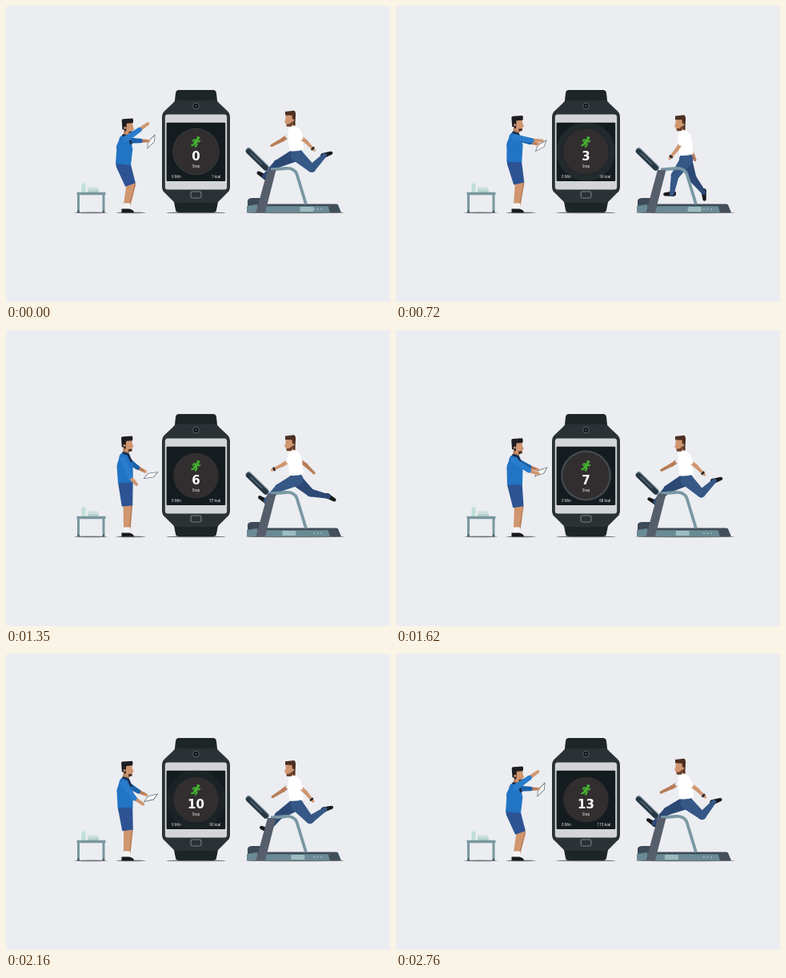
Write an HTML page with a canvas that moves like this. It is 480x370 px and loops after 2.79 s.

```html
<!DOCTYPE html>
<html lang="en">
<head>
<meta charset="utf-8">
<title>Treadmill session</title>
<style>
html, body { margin: 0; width: 100%; height: 100%; overflow: hidden; background: #ebedf1; }
canvas { display: block; width: 480px; height: 370px; }
</style>
</head>
<body>
<canvas id="stage"></canvas>
<script>
const LOOP = 2790, TICK = 30, STRIDE = LOOP / 5, CHEER = LOOP / 3, PULSE = LOOP / 2;
const SKIN = '#cf9670', SKIN_SHADE = '#b87d58', SHOE = '#17191c';
const canvas = document.getElementById('stage');
const g = canvas.getContext('2d');
const dpr = window.devicePixelRatio || 1;
canvas.width = 480 * dpr;
canvas.height = 370 * dpr;
g.scale(dpr, dpr);

const clamp = x => Math.max(0, Math.min(1, x));
const smooth = (a, b, x) => { const k = clamp((x - a) / (b - a)); return k * k * (3 - 2 * k); };
const mix = (a, b, k) => a + (b - a) * k;
const mixPt = (a, b, k) => [mix(a[0], b[0], k), mix(a[1], b[1], k)];
const wave = (u, peak) => Math.cos(2 * Math.PI * (u - peak));

// Angles run from straight down, positive towards the left
function polar(p, deg, len) {
  const a = deg * Math.PI / 180;
  return [p[0] - len * Math.sin(a), p[1] + len * Math.cos(a)];
}
function unit(a, b) {
  const len = Math.hypot(b[0] - a[0], b[1] - a[1]) || 1;
  return [(b[0] - a[0]) / len, (b[1] - a[1]) / len];
}

function line(pts, color, width, cap = 'round') {
  g.beginPath();
  pts.forEach(p => g.lineTo(p[0], p[1]));
  g.lineCap = cap;
  g.lineJoin = 'round';
  g.lineWidth = width;
  g.strokeStyle = color;
  g.stroke();
}
function disc(x, y, r, fill) {
  g.beginPath();
  g.arc(x, y, r, 0, 7);
  g.fillStyle = fill;
  g.fill();
}
function box(x, y, w, h, r, fill) {
  g.beginPath();
  g.roundRect(x, y, w, h, r);
  g.fillStyle = fill;
  g.fill();
}
function path(d, fill) {
  g.fillStyle = fill;
  g.fill(new Path2D(d));
}
function text(s, x, y, font, align = 'center') {
  g.font = font;
  g.textAlign = align;
  g.fillStyle = '#fff';
  g.fillText(s, x, y);
}
function shadow(x1, x2) {
  g.beginPath();
  g.ellipse((x1 + x2) / 2, 258.3, (x2 - x1) / 2, .9, 0, 0, 7);
  g.fillStyle = '#6d7377';
  g.fill();
}
// Tapered segment with square ends
function tube(a, b, w1, w2, fill) {
  const [dx, dy] = unit(a, b);
  g.beginPath();
  for (const [p, w] of [[a, w1], [a, -w1], [b, -w2], [b, w2]]) g.lineTo(p[0] - dy * w / 2, p[1] + dx * w / 2);
  g.fillStyle = fill;
  g.fill();
}
function limb(a, b, w1, w2, fill) {
  tube(a, b, w1, w2, fill);
  disc(a[0], a[1], w1 / 2, fill);
  disc(b[0], b[1], w2 / 2, fill);
}

function table() {
  const steel = '#7a979f';
  shadow(85, 127);
  box(94.5, 221.5, 5, 12, 1.5, '#bfe0d8');
  box(95.5, 219.6, 3, 2.2, .5, '#dcebea');
  box(102, 226.4, 13, 3, 1, '#c9dfdc');
  box(102, 229.8, 14, 3.2, 1, '#b4d0ce');
  for (const x of [89, 120.5]) {
    box(x, 234, 3, 22.5, 0, steel);
    disc(x + 1.5, 257, 1.5, '#4a565c');
  }
  box(88.5, 232.8, 36, 3.4, .8, steel);
}

function watch(t) {
  const strap = '#1e2527';
  shadow(200, 275);
  path('M216 105H259Q262.500 105 263 109L264.500 123H210.500L212 109Q212.500 105 216 105Z', strap);
  path('M209 240H266L263 255Q262.700 258 259 258H216Q212.300 258 212 255Z', strap);
  path('M213 118H262Q265 119 267 122L276 130.500Q280 133.500 280 139V226Q280 231 276 234L267 243' +
       'Q265 246 262 246H213Q210 246 208 243L199 234Q195 231 195 226V139Q195 133.500 199 130.500L208 122' +
       'Q210 119 213 118Z', '#2a3235');
  disc(237.5, 125, 4, '#667074');
  disc(237.5, 125, 3.3, '#11171a');
  disc(237.5, 125, 1.4, '#304657');
  box(198.8, 135.6, 77.4, 93.8, 3.5, '#d3d5d6');
  box(200.6, 145.8, 73.6, 73.2, 1, '#151c20');
  box(230.5, 231.5, 14, 9, 2.4, '#788185');
  box(231.6, 232.6, 11.8, 6.8, 1.5, '#2a3235');

  const label = '4.5px "Open Sans", "Noto Sans", sans-serif';
  text('0 Min', 207, 214.6, label, 'left');
  text(Math.floor(1 + t * .0415) + ' kcal', 268.5, 214.6, label, 'right');

  const q = (t % PULSE) / 850;
  if (q < 1) {
    g.globalAlpha = 1 - smooth(.6, 1, q);
    disc(237.5, 182, 29 + 9 * q, '#42484b');
    disc(237.5, 182, 28 + 2.6 * q, '#1d2326');
    g.globalAlpha = 1;
  }
  disc(237.5, 182, 28.3, '#322e30');

  const green = '#45b030';
  disc(240.3, 165, 2, green);
  line([[238.8, 168], [236.3, 171]], green, 4);
  line([[236.3, 171.2], [238.6, 173], [237, 175.6]], green, 2.3);
  line([[236, 171.4], [234.6, 173.6], [232.4, 174.2]], green, 2.3);
  line([[233.6, 168.8], [235, 167], [239, 168], [240.8, 169.8], [242.4, 168.6]], green, 1.8);
  text(Math.floor(t * 13 / 2760 + 1e-6), 237.5, 193.4, 'bold 15px "DejaVu Sans", sans-serif');
  text('Step', 237.5, 202, label);
}

function coach(t) {
  const p = (t % CHEER) / CHEER;
  const c = smooth(0, 1, .5 + .75 * wave(p, .015));
  const lift = p < .5 ? smooth(0, .03, p) : 0;
  const at = (stand, crouch) => mixPt(stand, crouch, c);
  const shirt = '#2274c4', shorts = '#2d5393', dark = '#1d1d22';

  const shoulder = at([148.5, 160], [148.5, 168]);
  const hip = at([149.5, 191], [146.5, 198]);
  const knee = at([151.5, 220], [155.5, 223.5]);
  const head = at([144, 133], [144.7, 141]);

  shadow(137, 175);
  limb([knee[0] + 1.5, knee[1]], [152.5, 248], 10, 6.5, SKIN_SHADE);
  limb(knee, [150.5, 248], 10, 7, SKIN);
  box(146.8, 246.6, 8.6, 7, 1, '#f3f4f4');
  path('M144.500 253.500H154Q159.500 254.500 160 258.200H144.500Z', SHOE);
  limb(hip, hip, 18, 18, shorts);
  tube(hip, knee, 18.5, 13.5, shorts);

  // Arm with the tablet
  const pad = at([181, 181.7], [181.5, 169.6 - lift]);
  const elbow = polar([shoulder[0] + 3.5, shoulder[1] + 2], mix(-51, -95, c), 16);
  const hand = polar(elbow, mix(-63, -90, c), 10.5);
  limb(elbow, hand, 4.8, 3.4, SKIN_SHADE);
  limb(shoulder, elbow, 8, 5.5, '#1c62aa');

  // Torso and head
  const neck = [head[0] + 6, head[1] + 16];
  limb(neck, [neck[0], neck[1] + 4], 7, 8, SKIN_SHADE);
  limb(shoulder, [mix(shoulder[0], hip[0], .3), mix(shoulder[1], hip[1], .3)], 14.5, 20, shirt);
  tube(polar(shoulder, 0, 9), hip, 20, 19, shirt);
  line([[shoulder[0] - 2, shoulder[1] - 6.5], [shoulder[0] + 4, shoulder[1] - 4.5], [shoulder[0] + 8, shoulder[1] + 4]], '#1b2b48', 2.6);
  g.save();
  g.translate(...head);
  path('M3 4H13.500L13.800 9L15.600 13L13.800 14.200L13.200 18Q9 20.500 4.500 17.500Z', SKIN);
  path('M0 2Q0 .6 2 .3L13.500 -.4Q15 1 14 5.200L6.200 5.800L5.800 10.500L5.600 15.500H4L3 13.500H.8Z', dark);
  path('M8.500 16.300L13.500 15.500V18.300L9.500 19.500Z', '#4b3027');
  disc(4, 11.300, 1.5, SKIN);
  g.restore();

  // Tablet
  g.save();
  g.translate(...pad);
  g.rotate(mix(0, -.64, c));
  path('M-9.500 4.300L-3.500 -2.800L9.500 -4.500L3.500 2.600Z', '#4e5861');
  path('M-8 3.500L-3.100 -2.100L7.900 -3.600L3.100 2Z', '#f7f8f9');
  g.restore();
  disc(hand[0], hand[1], 1.9, SKIN);

  // Free arm
  const joint = polar(at([146.5, 162], [150.5, 166]), mix(-21, -125 - 13 * lift, c), mix(23, 20, c));
  const palm = polar(joint, mix(-41, -125 - 22 * lift, c), 13);
  limb(joint, palm, 5, 3.6, SKIN);
  limb(at([146.5, 162], [150.5, 166]), joint, 8, 5.8, '#2a7ccc');
}

function leg(u, hip, kick, fill) {
  const thigh = 8 + 58 * wave(u, .46);
  const flex = 18 + kick.deg * Math.pow(.5 + .5 * wave(u, kick.peak), kick.power);
  const knee = polar(hip, thigh, 25);
  const ankle = polar(knee, thigh - flex, 23);
  // The trailing foot points its toes
  const [dx] = unit(knee, ankle);
  const foot = thigh - flex + mix(75, 18, clamp(dx * 1.2));
  const heel = polar(ankle, foot, -2);
  const toe = polar(heel, foot, 10.5);
  limb(heel, toe, 6.5, 4.2, SHOE);
  limb(knee, ankle, 10, 5.5, fill);
  limb(hip, knee, 16, 10, fill);
}

function arm(u, shoulder, skin, cloth, banded) {
  const upper = 2 + 56 * wave(u, .45);
  const elbow = polar(shoulder, upper, 18);
  const sleeve = polar(shoulder, upper, 9);
  const wrist = polar(elbow, upper + 7, 12);
  limb(sleeve, elbow, 5.2, 4.6, skin);
  limb(elbow, polar(wrist, upper + 7, 3), 4.6, 3.2, skin);
  if (banded) line([polar(wrist, upper + 97, 2.4), polar(wrist, upper - 83, 2.4)], '#1e2428', 2.4, 'butt');
  limb(shoulder, sleeve, 8, 7, cloth);
}

function runner(u) {
  const bob = 3.5 - 3.5 * wave(2 * u, -.06);
  const opposite = (u + .5) % 1;
  arm(opposite, [360, 157 + bob], SKIN_SHADE, '#e6e9ec', false);
  leg(opposite, [362, 186 + bob], { peak: .11, deg: 80, power: 5 }, '#2c4975');
  leg(u, [363.5, 186 + bob], { peak: .95, deg: 72, power: 1.5 }, '#365887');

  g.save();
  g.translate(0, bob);
  path('M354 146H361.500V152Q358 155 354.500 152Z', SKIN_SHADE);
  path('M354.500 150Q361 148 365.500 152Q369 155 370 163L372 179Q364 182 354.500 181Q353.500 173 352.500 166Q351.500 157 354.500 150Z', '#fff');
  path('M349.500 135H360V147L356.500 150H351L350 147L348 144.800L349.500 141Z', SKIN);
  path('M349 131.800L360 130.500Q362.500 131.500 362 137L361.300 149H359.300L358 142L357.500 136.500L349 136.200Z', '#4c2f22');
  path('M350.500 147.500L354.500 147L358 144L359 147L356.500 150.500H351Z', '#6b4431');
  disc(358.8, 142.5, 1.5, SKIN);
  g.restore();
  arm(u, [361, 158 + bob], SKIN, '#fff', true);
}

function treadmill(u) {
  shadow(299, 424);
  path('M302 243Q303 240 308 240H318V251H302Z', '#3e4a58');
  path('M301 250L314 248H415L418.500 258H301Z', '#6a8a95');
  path('M314 247.600H413.500L414.500 250.200H314Z', '#3f4c58');
  path('M402 248H414.500L419 258H405Z', '#424f5b');
  const slide = (u * 2 + .05) % 1;
  box(367.5 - 45 * Math.pow(slide, 6), 251, 17, 6, 1, '#9cbcc2');
  for (let i = 0; i < 3; i++) disc(385 + i * 4.5, 254, .9, '#a7c0c6');
  g.strokeStyle = '#7a97a3';
  g.lineWidth = 3.8;
  g.stroke(new Path2D('M331 204.500L350 203Q360 202.500 363.500 210L375 248'));
  path('M327 205H337.500L324 258H312.500Z', '#565e6c');
  line([[303.5, 181], [325, 202]], '#8199a4', 8);
  line([[303.2, 181.6], [324.6, 202.4]], '#283742', 6.4);
  line([[306, 184], [320, 197.5]], '#526874', 1.6);
}

function frame(now) {
  const t = Math.floor((now % LOOP) / TICK) * TICK;
  const u = (t % STRIDE) / STRIDE;
  g.fillStyle = '#ebedf1';
  g.fillRect(0, 0, 480, 370);
  table();
  coach(t);
  watch(t);
  runner(u);
  treadmill(u);
}

let start;
function loop(now) {
  if (start === undefined) start = now;
  frame(Math.max(0, now - start));
  requestAnimationFrame(loop);
}
frame(0);
requestAnimationFrame(loop);
</script>
</body>
</html>
```
